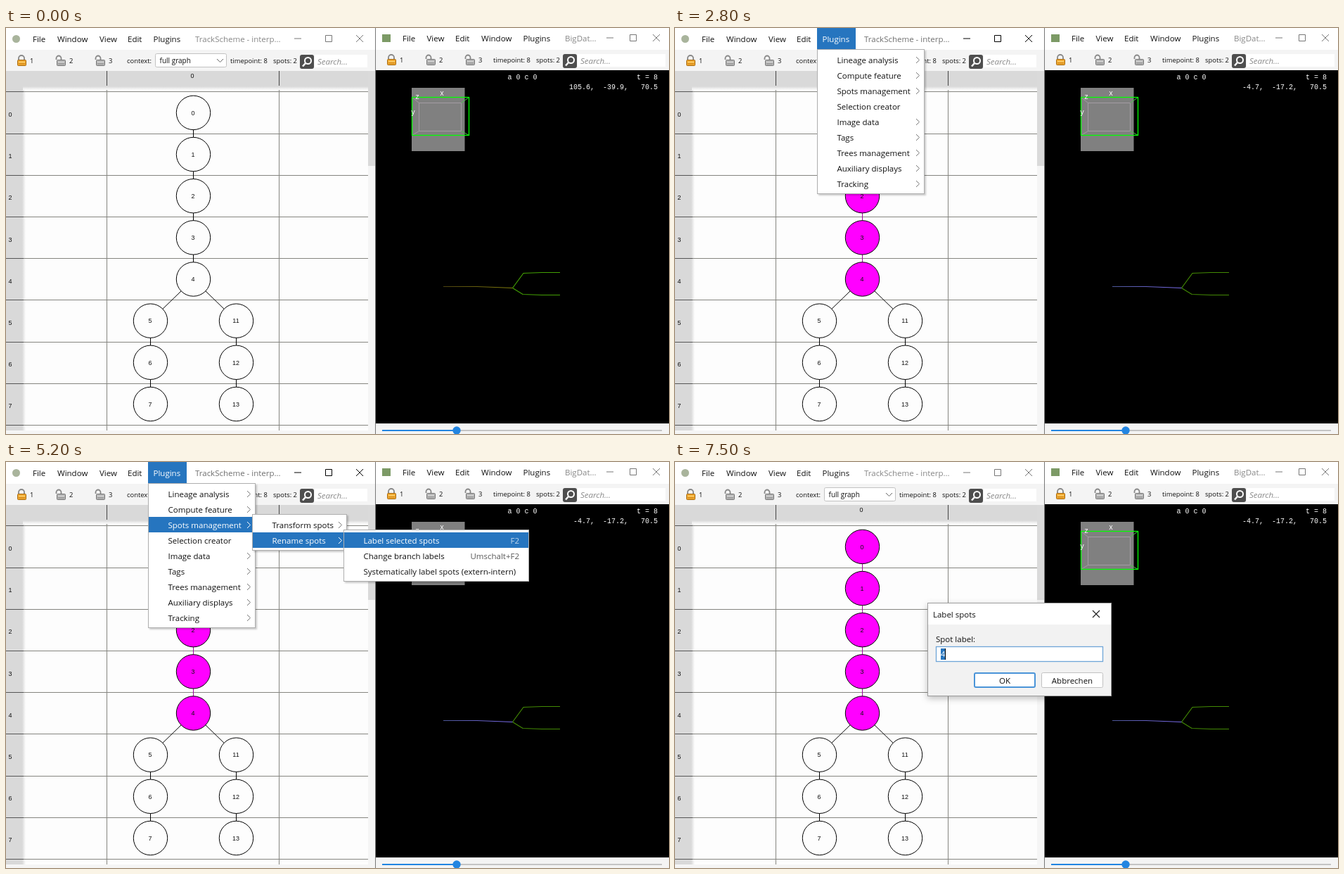
These frames come from a looping animation (943x577 px, 8 s). An HTML page:

```html
<!DOCTYPE html>
<html lang="en">
<head>
<meta charset="utf-8">
<title>Label selected spots</title>
<style>
html, body { margin: 0; width: 100%; height: 100%; overflow: hidden; background: #fff; }
svg { display: block; width: 943px; height: 577px; }
text { font: 11.5px "Open Sans", "Noto Sans", sans-serif; fill: #111; white-space: pre; }
text.small { font-size: 9.4px; }
text.node { font: 9px "Liberation Sans", Arial, sans-serif; }
text.hud { font: 10px "Liberation Mono", "Courier New", monospace; fill: #fff; }
text.hint { font-style: italic; fill: #8a8a8a; }
.mid { text-anchor: middle; }
.end { text-anchor: end; }
.node-ring { fill: #fdfdfd; stroke: #000; }
.picked .sel { fill: #f0f; }
.picked line.sel { stroke: #a000a0; }
.hot rect { fill: #2675bf; }
.hot text { fill: #fff; }
.hot path { stroke: #fff; }
</style>
</head>
<body>
<svg id="stage" viewBox="0 0 943 577">
  <defs>
    <linearGradient id="fadeY" x2="0" y2="1"><stop stop-color="#d9d9d9"/><stop offset="1" stop-color="#fdfdfd"/></linearGradient>
    <linearGradient id="fadeX"><stop stop-color="#d9d9d9"/><stop offset="1" stop-color="#fdfdfd"/></linearGradient>
    <linearGradient id="stem" gradientUnits="userSpaceOnUse" x1="622" x2="721"><stop stop-color="#4c4210"/><stop offset="1" stop-color="#85800c"/></linearGradient>
    <linearGradient id="stemSel" gradientUnits="userSpaceOnUse" x1="622" x2="721"><stop stop-color="#4c5696"/><stop offset="1" stop-color="#7b6cf0"/></linearGradient>
    <filter id="pop" x="-10%" y="-10%" width="120%" height="125%"><feDropShadow dx="2" dy="2" stdDeviation="1" flood-opacity=".2"/></filter>
    <filter id="float" x="-10%" y="-15%" width="120%" height="135%"><feDropShadow dx="0" dy="3" stdDeviation="5" flood-opacity=".25"/></filter>
  </defs>
</svg>
<script>
const LOOP = 8000, STEP = 100;
const stage = document.getElementById('stage');

const rect = (x, y, w, h, fill, more = '') => `<rect x="${x}" y="${y}" width="${w}" height="${h}" fill="${fill}" ${more}/>`;
const line = (x1, y1, x2, y2, stroke, more = '') => `<line x1="${x1}" y1="${y1}" x2="${x2}" y2="${y2}" stroke="${stroke}" ${more}/>`;
const path = (d, stroke, more = '') => `<path d="${d}" fill="none" stroke="${stroke}" ${more}/>`;
const text = (x, y, s, cls = '', more = '') => `<text x="${x}" y="${y}" class="${cls}" ${more}>${s}</text>`;
const group = (id, body, more = '') => `<g id="${id}" ${more}>${body}</g>`;

function lock(x, closed) {
  const body = closed ? '#f0a830' : '#b4b4b4', edge = closed ? '#a86a10' : '#777';
  const bow = closed ? 'M18 46v-3a4 4 0 0 1 8 0v3' : 'M15.500 45v-2a3.500 3.500 0 0 1 7 0v3';
  return `<g transform="translate(${x - 15})">` + path(bow, '#888', 'stroke-width="1.800"') +
    rect(16.5, 45.5, 12, 8, body, `stroke="${edge}" rx="1"`) +
    line(18, 48.5, 27, 48.5, closed ? '#ffdc80' : '#ddd') + line(18, 51, 27, 51, edge, 'opacity=".5"') + '</g>';
}

function controls(xs, id, y) {
  const [a, b, c] = xs;
  return group(id, path(`M${a} ${y}h10M${b + .5} ${y - 4.5}h9v9h-9zM${c} ${y - 5}l10 10m0-10l-10 10`, 'currentColor'), 'color="#777"');
}

// Lock buttons, counters and search box shared by both windows.
function toolbar(x, y, timeX, searchW) {
  let out = '';
  for (let i = 0; i < 3; i++) out += lock(15 + 56 * i, i === 0) + text(34 + 56 * i, 50, i + 1, 'small');
  out += text(timeX, 50, 'timepoint: 8', 'small') + text(timeX + 61, 50, 'spots: 2', 'small');
  const s = timeX + 99;
  out += rect(s + 21, 38, searchW, 18, '#fff') + rect(s, 38, 20, 20, '#4e4e4e', 'rx="3"') +
    `<circle cx="${s + 11.5}" cy="46.500" r="4.500" fill="none" stroke="#fff" stroke-width="2"/>` +
    line(s + 8, 50, s + 4, 54.5, '#fff', 'stroke-width="2.500"') + text(s + 25, 52, 'Search...', 'hint');
  return `<g transform="translate(${x} ${y})">${out}</g>`;
}

const menuBar = (items, y) => items.map(([x, s]) => text(x, y, s)).join('');

const rowY = i => 120.4 + 59.15 * i;

function schemeView() {
  let out = rect(0, 61, 525, 516, '#f5f5f5') + rect(25, 84, 490, 488, '#fdfdfd') +
    rect(0, 61, 515, 22, '#d9d9d9') + rect(0, 61, 24, 511, '#d9d9d9') +
    rect(24, 83, 491, 5, 'url(#fadeY)') + rect(23, 88, 5, 484, 'url(#fadeX)') +
    rect(515, 61, 10, 135, '#dadada');
  for (const x of [143.5, 388.5]) out += line(x, 88, x, 572, '#858580') + line(x, 61, x, 82, '#444');
  for (let i = 0; i < 9; i++) {
    const y = Math.round(90.4 + 59.2 * i) + .5;
    out += line(25, y, 515, y, '#858580') + line(0, y, 25, y, '#555');
    if (i < 8) out += text(6, 126 + 59.2 * i, i, 'node mid');
  }
  out += text(265, 71, '0', 'node mid');

  const nodes = [];
  for (let i = 0; i < 8; i++) nodes.push([i < 5 ? 266.5 : 205.5, i, i]);
  for (let i = 5; i < 8; i++) nodes.push([327.5, i, i + 6]);
  let edges = '', rings = '';
  nodes.forEach(([x, row, label], k) => {
    const cls = label < 5 ? 'sel' : '';
    if (k) {
      const from = nodes[label === 11 ? 4 : k - 1];
      edges += line(from[0], rowY(from[1]), x, rowY(row), '#000', `class="${cls}"`);
    }
    rings += `<circle cx="${x}" cy="${rowY(row)}" r="24.200" class="node-ring ${cls}"/>` +
      text(x - .5, rowY(row) + 3.2, label, 'node mid');
  });
  return out + group('tree', edges + rings) + rect(237.5, 93.5, 0, 0, 'none', 'id="marquee" stroke="#555"');
}

function leftWindow() {
  return rect(0, 0, 525, 31, '#fff') + rect(0, 31, 525, 30, '#f4f4f4') +
    '<circle cx="14.500" cy="15.500" r="5.500" fill="#a9b49c"/>' + rect(202, 0, 55, 30, '#fff', 'id="pluginsBg"') +
    menuBar([[38, 'File'], [73, 'Window'], [133, 'View'], [173, 'Edit']], 20) +
    text(209.5, 20, 'Plugins', '', 'id="plugins"') + text(269, 20, 'TrackScheme - interp...', '', 'id="caption"') +
    controls([410, 454, 498], 'buttons', 15) + toolbar(0, 0, 319, 75) +
    text(172, 50, 'context:', 'small') +
    rect(212.5, 36.5, 101, 19, '#fff', 'rx="2" stroke="#c2c2c2"') + text(218.5, 50, 'full graph', '', 'style="font-size:10px"') +
    path('M300 44l4.500 4.500l4.500-4.500', '#666', 'id="comboArrow"') + schemeView();
}

function rightWindow() {
  const grey = '#a49ca4', green = '#0f0';
  return rect(525, 0, 418, 31, '#fff') + rect(525, 31, 418, 30, '#f4f4f4') + line(525.5, 0, 525.5, 577, '#777') +
    rect(535, 9, 12, 11, '#7c9a66') +
    menuBar([[564, 'File'], [598.5, 'View'], [639, 'Edit'], [676, 'Window'], [735.5, 'Plugins']], 19) +
    text(795, 19, 'BigDat...', '', 'fill-opacity=".5"') + controls([854, 887, 920], 'buttons2', 14) +
    toolbar(526, -1, 167, 125) +
    rect(526, 60, 417, 502, '#000') + rect(577, 85, 75.5, 90, '#808080') +
    rect(587.5, 106.5, 60, 40, 'none', `stroke="${grey}"`) +
    path('M577.500 98.500l10 8M577.500 152.500l10-6', grey) + path('M658.500 98.500l-11 8M658.500 152.500l-11-6', '#4cc84c') +
    rect(577.5, 98.5, 81, 54, 'none', `stroke="${green}" stroke-width="1.300"`) +
    text(617, 96, 'x', 'hud') + text(576, 123, 'y', 'hud') + text(582, 101, 'z', 'hud') +
    text(713.5, 73, 'a 0 c 0', 'hud') + text(927, 73, 't = 8', 'hud end') + text(927, 87, '', 'hud end', 'id="coords"') +
    path('M720.500 369.500L736 348.500L762 347.500H788M720.500 369.500L735 378.500L762 379.500H788', '#43a004', 'id="forks" stroke-width="1.200"') +
    path('M622 367.500H670L720.500 369.500', 'url(#stem)', 'id="stemLine" stroke-width="1.100"') +
    rect(526, 562, 417, 15, '#f4f4f4') + line(641, 572, 933, 572, '#c4c4c4', 'stroke-width="2"') +
    line(535, 572, 641, 572, '#2285e1', 'stroke-width="2"') + '<circle cx="641" cy="572" r="5.700" fill="#2285e1"/>';
}

// Items: [label, accelerator], where '>' marks a submenu.
function popup(id, x, y, w, items) {
  let out = rect(x + .5, y + .5, w, items.length * 22 + 7, '#fff', 'stroke="#aeaeae" filter="url(#pop)"');
  items.forEach(([label, key], i) => {
    const top = y + 4 + 22 * i;
    out += '<g class="item">' + rect(x + 1, top, w - 1, 22, 'none') + text(x + 28.5, top + 16, label) +
      (key === '>' ? path(`M${x + w - 11} ${top + 7}l4.500 4.500l-4.500 4.500`, '#777') :
        key ? text(x + w - 13, top + 16, key, 'end', 'fill-opacity=".7"') : '') + '</g>';
  });
  return group(id, out);
}

function dialog() {
  return group('dialog', rect(0, 0, 262, 133, '#f2f2f2', 'filter="url(#float)"') + rect(0, 0, 262, 31, '#fff') +
    rect(.5, .5, 261, 132, 'none', 'stroke="#777" stroke-opacity=".7"') +
    text(8, 21, 'Label spots') + path('M235 11l10 10m0-10l-10 10', '#222', 'stroke-width="1.200"') +
    text(12, 56, 'Spot label:') + rect(12.5, 62.5, 237, 21, '#fff', 'stroke="#6fa5d8" stroke-width="1.300"') +
    rect(19, 65, 7, 16, '#2675bf') + text(19, 77, '4', '', 'style="fill:#fff"') + rect(25, 65, 1, 16, '#000', 'id="caret"') +
    rect(67, 100, 86, 20, '#fff', 'rx="2" stroke="#4a94d8" stroke-width="2"') + text(110, 115, 'OK', 'mid') +
    rect(162.5, 99.5, 87, 21, '#fff', 'rx="2" stroke="#c2c2c2"') + text(206, 115, 'Abbrechen', 'mid'));
}

stage.insertAdjacentHTML('beforeend', leftWindow() + rightWindow() +
  popup('menu1', 202, 30, 152, [['Lineage analysis', '>'], ['Compute feature', '>'], ['Spots management', '>'],
    ['Selection creator'], ['Image data', '>'], ['Tags', '>'], ['Trees management', '>'],
    ['Auxiliary displays', '>'], ['Tracking', '>']]) +
  popup('menu2', 350, 74, 134, [['Transform spots', '>'], ['Rename spots', '>']]) +
  popup('menu3', 480, 96, 263, [['Label selected spots', 'F2'], ['Change branch labels', 'Umschalt+F2'],
    ['Systematically label spots (extern-intern)']]) + dialog());

const el = {};
stage.querySelectorAll('[id]').forEach(e => el[e.id] = e);
const set = (id, attrs) => { for (const k in attrs) el[id].setAttribute(k, attrs[k]); };
const show = (id, on) => { el[id].style.display = on ? '' : 'none'; };

const CLOSE = 5600;
// Opening time and hover steps [time, item] of each menu.
const menus = {
  menu1: [2800, [[3300, 0], [3400, 1], [3500, 2]]],
  menu2: [3700, [[4400, 0], [4500, 1]]],
  menu3: [4700, [[5200, 0]]]
};
const ease = p => { p = Math.max(0, Math.min(1, p)); return p * p * (3 - 2 * p); };

function draw(now) {
  const t = Math.floor(now % LOOP / STEP) * STEP;
  const active = t >= 800 && t < 5700, open = t >= 2800 && t < CLOSE;

  el.coords.textContent = t < 100 ? '105.6,  -39.9,   70.5' : '-4.7,  -17.2,   70.5';
  set('buttons', { color: active ? '#000' : '#777' });
  set('caption', { 'fill-opacity': active ? .6 : .5 });

  const grow = ease((t - 800) / 900);
  show('marquee', t > 800 && t < 1800);
  set('marquee', { width: Math.round(68 * grow), height: Math.round(278 * grow) });
  el.tree.classList.toggle('picked', t >= 1800);
  set('stemLine', { stroke: t >= 1900 ? 'url(#stemSel)' : 'url(#stem)' });
  set('forks', { stroke: t >= 1900 ? '#438a04' : '#43a004' });

  set('comboArrow', { stroke: t === 2400 ? '#aaa' : '#666' });
  set('pluginsBg', { fill: open ? '#2675bf' : t >= 2500 && t < CLOSE ? '#e6e6e6' : '#fff' });
  el.plugins.style.fill = open ? '#fff' : '';

  for (const id in menus) {
    const [start, hovers] = menus[id];
    show(id, t >= start && t < CLOSE);
    const hot = hovers.reduce((found, [at, i]) => t >= at ? i : found, -1);
    el[id].querySelectorAll('.item').forEach((item, i) => item.classList.toggle('hot', i === hot));
  }

  const drag = ease((t - 7000) / 300);
  show('dialog', t >= 7000);
  set('dialog', { transform: `translate(${Math.round(777 - 418 * drag)} ${Math.round(210 - 10 * drag)})` });
  show('caret', t < 7200 || t >= 7500);
}

const begin = performance.now();
function tick() {
  draw(performance.now() - begin);
  requestAnimationFrame(tick);
}
tick();
</script>
</body>
</html>
```
